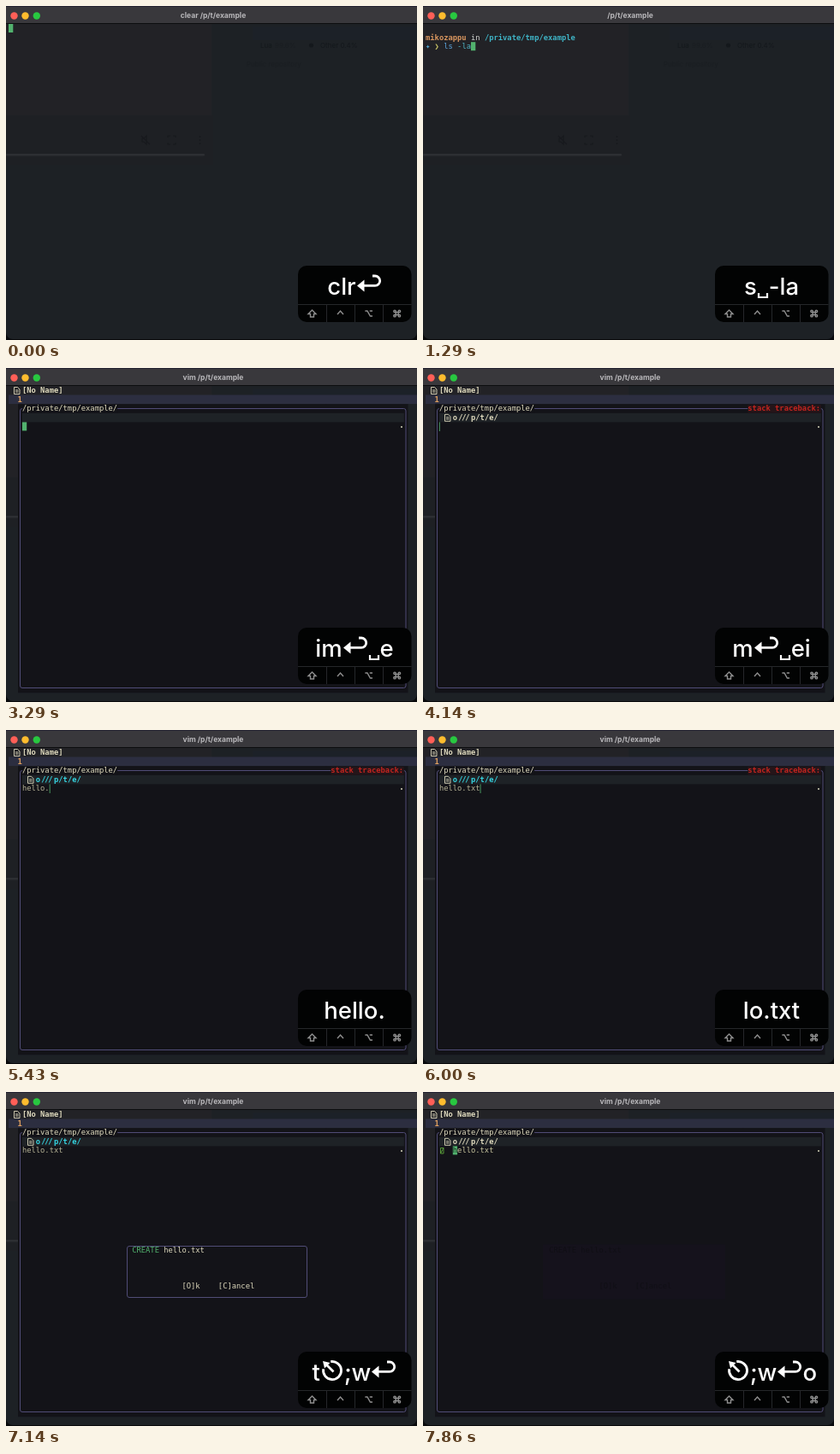
Write an HTML page that moves like this. It is 480 by 391 pixels and loops after 8000 ms.

```html
<!DOCTYPE html>
<html lang="en">
<head>
<meta charset="utf-8">
<title>Terminal session</title>
<style>
  html, body { margin: 0; width: 100%; height: 100%; overflow: hidden; background: #08090b; }
  #stage { position: absolute; left: 0; top: 0; width: 480px; height: 391px; overflow: hidden; }
  #stage > svg { position: absolute; left: 0; top: 0; }
  .title { font: 700 8.5px Inter, "Open Sans", sans-serif; fill: #b9b8bb; text-anchor: middle; }
  .term { font: 8.8px "DejaVu Sans Mono", "Noto Sans Mono", monospace; white-space: pre; }
  .bold { font-weight: 700; }
  .tight { letter-spacing: -1.2px; }
  .ui { font: 8px Inter, sans-serif; fill: #14181c; }
  #keys {
    position: absolute; left: 341px; top: 312.4px; width: 132px;
    font: 500 27.5px/33.3px Inter, "Open Sans", sans-serif;
    color: #fff; text-align: center; white-space: pre;
  }
  #keys svg { overflow: visible; fill: none; stroke: #fff; stroke-width: 2.8; }
  #keys .head { fill: #fff; stroke: none; }
</style>
</head>
<body>
<div id="stage">
  <svg width="480" height="391" viewBox="0 0 480 391">
    <defs><clipPath id="window"><rect y="-10" width="480" height="400" rx="8"/></clipPath></defs>
    <g clip-path="url(#window)">
      <rect width="480" height="391" fill="#1d2125"/>
      <!-- windows faintly visible through the terminal -->
      <rect y="21" width="240" height="107" fill="#222226"/>
      <rect y="128" width="242" height="58" fill="#1e2024"/>
      <rect y="173" width="232" height="2.500" rx="1.200" fill="#2d2f33"/>
      <g fill="none" stroke="#17191d" stroke-width="1.200">
        <path d="M159 155h2l3-3v10l-3-3h-2zM158 152l10 10M189 154v-2h3M195 152h3v2M198 160v2h-3M192 162h-3v-2"/>
        <path d="M226.500 152v10" stroke-dasharray="2 2"/>
      </g>
      <rect x="288" y="24" width="192" height="16" fill="#1c2128"/>
      <g class="ui">
        <text x="297" y="49">Lua</text><text x="314" y="49" opacity=".4">99.6%</text>
        <circle cx="356.500" cy="46" r="2.600"/><text x="367" y="49">Other 0.4%</text>
        <text x="281" y="71" opacity=".4">Public repository</text>
      </g>
      <rect width="480" height="20" fill="#39383c"/>
      <rect width="480" height="1" fill="#232230"/>
      <rect y="20" width="480" height="1" fill="#0c0d0f"/>
      <circle cx="9.500" cy="11.500" r="4.200" fill="#ff5f57"/>
      <circle cx="22.500" cy="11.500" r="4.200" fill="#febc2e"/>
      <circle cx="35.800" cy="11.500" r="4.200" fill="#28c840"/>
      <g id="screen"></g>
    </g>
    <rect x="341" y="304" width="132.500" height="66" rx="10" fill="#020303"/>
    <path d="M341 349.500H473.500M374.500 350V370M407.500 350V370M440.500 350V370" stroke="#25272a"/>
    <g fill="none" stroke="#8f8f8f" stroke-width="1.400">
      <path transform="translate(357.500 360)" d="M0-4L4.500 .5H2V4H-2V.5H-4.500z"/>
      <path transform="translate(390.500 359.500)" d="M-3.500 1.500L0-2.500L3.500 1.500"/>
      <path transform="translate(423.700 360)" d="M-4.300-3H-1.700L1.700 3H4.300M1-3H4.300"/>
      <path transform="translate(456.700 360)" d="M-1.500-1.500H1.500V1.500H-1.500z
        M-1.500-1.500H-2.700A1.200 1.200 0 1 1-1.500-2.700z M1.500-1.500V-2.700A1.200 1.200 0 1 1 2.700-1.500z
        M1.500 1.500H2.700A1.200 1.200 0 1 1 1.500 2.700z M-1.500 1.500V2.700A1.200 1.200 0 1 1-2.700 1.500z"/>
    </g>
  </svg>
  <div id="keys"></div>
</div>
<script>
const LOOP = 8000, CELL = 5.3, ROW = 10.6;
const GREEN = '#52b26e', PALE = '#ded9bd', DIM = '#b5b295', CYAN = '#35d5e2';
const screen = document.getElementById('screen');
const keyBox = document.getElementById('keys');

// Each step adds a pressed key and merges its changes into the state.
const steps = [
  [0, 'clr⏎', { title: 'clear /p/t/example' }],
  [140, '', { title: '/p/t/example' }],
  [290, '', { cmds: [''] }],
  [570, 'l', { cmds: ['l'] }],
  [710, 's', { cmds: ['ls'] }],
  [1000, '␣', { cmds: ['ls '] }],
  [1140, '-l', { cmds: ['ls -l'] }],
  [1290, 'a', { cmds: ['ls -la'] }],
  [1430, '⏎', { title: 'ls -la /p/t/example' }],
  [1570, '', { title: '/p/t/example', cmds: ['ls -la', ''] }],
  [2290, 'v', { cmds: ['ls -la', 'v'] }],
  [2430, 'i', { cmds: ['ls -la', 'vi'] }],
  [2570, 'm', { cmds: ['ls -la', 'vim'] }],
  [2710, '⏎', { title: 'vim /p/t/example', cmds: [] }],
  [2860, '', { vim: true }],
  [3000, '␣', {}],
  [3140, 'e', {}],
  [3290, '', { float: true, text: '', cursor: 'block' }],
  [3430, '', { error: true }],
  [3710, '', { header: PALE }],
  [4140, 'i', { cursor: 'bar' }],
  ...[...'hello.txt'].map((ch, i, all) => [
    [4570, 4710, 4860, 5000, 5140, 5430, 5710, 5860, 6000][i], ch,
    { text: all.slice(0, i + 1).join(''), header: CYAN }
  ]),
  [6570, '⎋', { error: false, cursor: 'block' }],
  [6710, ';', { cmdline: '', cursor: '' }],
  [6860, 'w', { cmdline: 'w' }],
  [7000, '⏎', {}],
  [7140, '', { cmdline: null, dialog: 'open' }],
  [7710, 'o', { dialog: 'fading' }],
  [7860, '', { header: PALE, saved: true }]
];

const colX = col => 3 + col * CELL;
const rowY = row => 21 + row * ROW;
const rect = (x, y, w, h, fill, extra = '') =>
  `<rect x="${x}" y="${y}" width="${w}" height="${h}" fill="${fill}" ${extra}/>`;
const frame = (x, y, w, h, stroke) =>
  rect(x, y, w, h, 'none', `rx="2.500" stroke="${stroke}"`);
const text = (col, row, str, fill, style = '') =>
  `<text class="term ${style}" x="${colX(col)}" y="${rowY(row) + 8}" fill="${fill}">${str}</text>`;
const block = (col, row, fill = GREEN) => rect(colX(col), rowY(row), CELL, 10, fill);
const fileIcon = (x, row) =>
  `<path transform="translate(${x} ${rowY(row) + 1})" d="M.5.500H4.500L7 3V8.500H.5zM2 4H5.500M2 6H5.500" fill="none" stroke="${PALE}" stroke-width=".9"/>`;

function prompt(cmd, i, all) {
  const row = 1 + i * 3;
  const [name, ...args] = cmd.split(' ');
  return text(0, row, 'mikozappu', '#d9965f', 'bold') + text(10, row, 'in', '#d5d6d3') +
    text(13, row, '/private/tmp/example', '#3fb4c6', 'bold') +
    text(0, row + 1, '✦', '#4da6d0') + text(2, row + 1, '❯', '#cbc667') +
    text(4, row + 1, name, '#5ba3dc') +
    text(5 + name.length, row + 1, args.join(' '), '#4fb3c4') +
    (i === all.length - 1 ? block(4 + cmd.length, row + 1) : '');
}

// The three slashes join into one narrow ligature.
const drawHeader = fill => fileIcon(25, 3) + text(6, 3, 'o', fill, 'bold') +
  text(7.2, 3, '///', fill, 'bold tight') + text(10, 3, 'p/t/e/', fill, 'bold');

function drawFloat(s) {
  let out = rect(14, 42.2, 455.5, 338, '#131318') +
    rect(18.9, 52.8, 446, ROW, '#1e2226') + frame(16.5, 47.5, 450.5, 327, '#504c76') +
    rect(18.9, 43, 111.3, 9.5, '#131318') + text(3, 2, '/private/tmp/example/', PALE) +
    rect(461, 68, 2, 2, '#a5a391');
  if (s.error) out += rect(379.3, 43, 85.5, 9.5, '#251519') + text(71, 2, 'stack traceback:', '#c3241f', 'bold');
  if (s.header) out += drawHeader(s.header);
  if (s.saved) {
    return out + '<path d="M20.500 65.500h3.500v6.500h-3.500zM20.500 72l3.500-6.500" fill="none" stroke="#5da43c" stroke-width=".9"/>' +
      block(6, 4) + text(6, 4, '<tspan fill="#14251a">h</tspan>ello.txt', '#c9c69f');
  }
  const end = 3 + s.text.length;
  if (s.cursor === 'bar') out += rect(colX(end), rowY(4), 1, ROW, '#46945d');
  if (s.cursor === 'block') out += block(Math.max(3, end - 1), 4);
  return out + text(3, 4, s.text, DIM);
}

function drawCmdline(cmd) {
  return rect(72, 180, 340, 31, '#20242b') + rect(75, 184.5, 334, 21.5, '#1b2025') +
    frame(75, 184.5, 334, 21.5, '#4f7f96') + rect(215.5, 180, 47.7, 10.5, '#131318') +
    text(41.1, 15, 'Cmdline', PALE) +
    '<path d="M84.500 192.500L89 196.200L84.500 200" fill="none" stroke="#6b9fb5" stroke-width="2"/>' +
    text(17.1, 16, cmd, '#8d8f8e') + block(17.1 + cmd.length, 16, PALE);
}

function drawDialog(phase) {
  const open = phase === 'open';
  const ink = open ? PALE : '#100f15';
  return rect(140, 178.5, 213, 64, open ? '#131318' : '#15121c') +
    (open ? frame(141.5, 180.5, 210, 60, '#504c76') : '') +
    text(27.2, 15, 'CREATE', open ? GREEN : ink) + text(34.2, 15, 'hello.txt', ink) +
    text(38.2, 19, '[O]k', ink) + text(46.2, 19, '[C]ancel', ink);
}

function draw(s) {
  let out = `<text class="title" x="242" y="14.300">${s.title}</text>`;
  if (s.vim) {
    out += fileIcon(9, 0) + text(3, 0, '[No Name]', PALE, 'bold') +
      rect(3, 31.5, 477, ROW, '#2c2e40') + text(2, 1, '1', '#e0a060', 'bold');
    out += s.float ? drawFloat(s) : block(4, 1);
    if (s.cmdline != null) out += drawCmdline(s.cmdline);
    if (s.dialog) out += drawDialog(s.dialog);
  } else {
    out += s.cmds.length ? s.cmds.map(prompt).join('') : block(0, 0);
  }
  screen.innerHTML = out;
}

const glyphs = {
  '⏎': '<svg width="30" height="24"><path d="M19 2H22A5.700 5.700 0 0 1 22 13.400H7"/><path class="head" d="M1 13.400L9.500 6.400V20.400z"/></svg>',
  '⎋': '<svg width="28" height="24"><path d="M12.200 1.700A10.500 10.500 0 1 1 3.700 10.200M15.500 13.500L6 4"/><path class="head" d="M3 1L11.500 3L5 9.500z"/></svg>',
  '␣': '<svg width="14" height="24"><path d="M2 22V27H12V22" stroke-width="2.200"/></svg>'
};
const units = ch => '␣⎋'.includes(ch) ? 2 : 1;

// The key display holds six units; the oldest keys drop out first.
function drawKeys(pressed) {
  const shown = [...pressed];
  while (shown.reduce((sum, ch) => sum + units(ch), 0) > 6) shown.shift();
  keyBox.innerHTML = shown.map(ch => glyphs[ch] || ch).join('');
}

let current = -1;
function tick() {
  const time = performance.now() % LOOP;
  const index = steps.filter(([at]) => at <= time).length - 1;
  if (index !== current) {
    current = index;
    const past = steps.slice(0, index + 1);
    draw(Object.assign({ cmds: [] }, ...past.map(step => step[2])));
    drawKeys(past.map(step => step[1]).join(''));
  }
  requestAnimationFrame(tick);
}
tick();
</script>
</body>
</html>
```
